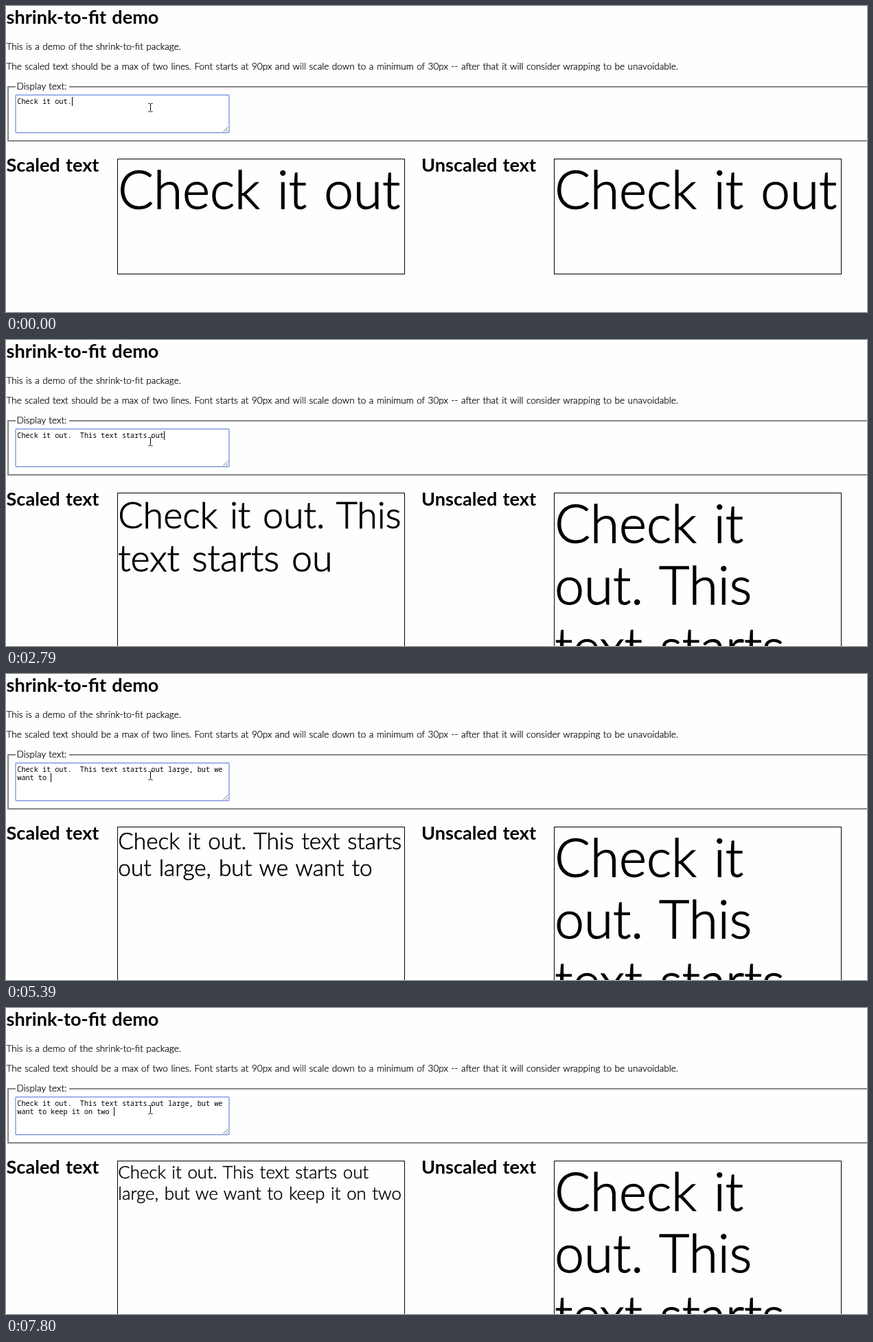
Animation of 1254 by 447 pixels, one loop 8 s. Source, as an HTML page:

```html
<!DOCTYPE html>
<html lang="en">
<head>
<meta charset="utf-8">
<title>shrink-to-fit demo</title>
<style>
  html, body { margin: 0; width: 100%; height: 100%; overflow: hidden; background: #fefefe; }
  svg { display: block; font-family: Lato, "Open Sans", sans-serif; }
  text { word-spacing: .06em; }
  .head { font-weight: 700; }
  .light { font-weight: 300; }
  .light text { stroke: #000; stroke-width: .018em; }
  .mono { font: 10.18px "Noto Sans Mono", "DejaVu Sans Mono", monospace; word-spacing: 0; white-space: pre; }
  .line { fill: none; stroke: #000; }
</style>
</head>
<body>
<svg width="1254" height="447" viewBox="0 0 1254 447">
  <g class="head">
    <text x=".5" y="26">shrink-to-fit demo</text>
    <text x=".5" y="242">Scaled text</text>
    <text x="605" y="242">Unscaled text</text>
  </g>
  <g class="light" id="body">
    <text x=".5" y="64">This is a demo of the shrink-to-fit package.</text>
    <text x=".5" y="93" id="intro">The scaled text should be a max of two lines. Font starts at 90px and will scale down to a minimum of 30px -- after that it will consider wrapping to be unavoidable.</text>
    <text x="15.5" y="122">Display text:</text>
  </g>
  <path d="M14 118H3V197H1254M92 118H1254" fill="none" stroke="#868686" stroke-width="2"/>
  <rect x="14" y="130" width="311" height="55" rx="1" fill="#fff" stroke="#7f9be0" stroke-width="1.4"/>
  <path d="M316.5 183.5l7-7M320.5 183.5l3-3" class="line" style="stroke:#777"/>
  <text class="mono" x="16.3" y="143"></text>
  <text class="mono" x="16.3" y="155"></text>
  <rect id="caret" width="1" height="13"/>
  <path d="M207.5 142.5h2l1 1 1-1h2M210.5 143v10M207.5 154.5h2l1-1 1 1h2" class="line"/>
  <rect class="line box" x="162.5" y="223.5" width="418"/>
  <rect class="line box" x="798.5" y="223.5" width="418"/>
  <g class="light" id="scaled"></g>
  <g class="light" id="plain"></g>
</svg>
<script>
const $ = q => document.querySelector(q), $$ = q => [...document.querySelectorAll(q)];
const MESSAGE = "Check it out.  This text starts out large, but we want to keep it on two ";
const LOOP = 8000, LAG = 125, MAX = 90, MIN = 30, ROOM = 414;
const WRAP = 50, PITCH = 6.11;

// Typing runs: first step, last step, number of steps, characters before and after
const RUNS = [
  [130, 790, 6, 13, 20],
  [1220, 1600, 4, 20, 25],
  [1730, 2130, 4, 25, 30],
  [2270, 2790, 5, 30, 35],
  [2920, 3300, 3, 35, 38],
  [3450, 4120, 6, 38, 47],
  [4390, 4540, 2, 47, 49],
  [4680, 5390, 6, 49, 58],
  [5820, 6210, 4, 58, 60],
  [6350, 6490, 2, 60, 63],
  [6890, 7800, 8, 63, 73]
];

const pen = document.createElement("canvas").getContext("2d");
function emWidth(text, weight) {
  pen.font = `${weight} 100px Lato, "Open Sans", sans-serif`;
  return pen.measureText(text).width / 100 + .06 * (text.split(" ").length - 1);
}

// Scale of the display face relative to its nominal size
const scale = 411 / MAX / emWidth("Check it out", 300);
const width = text => emWidth(text, 300) * scale;
$(".head").style.fontSize = 222 / emWidth("shrink-to-fit demo", 700) + "px";
$("#body").style.fontSize = 981 / emWidth($("#intro").textContent, 300) + "px";

function typedAt(t) {
  let count = t < 0 ? 12 : 13;
  for (const [start, end, steps, from, to] of RUNS) {
    if (t < start) break;
    const step = Math.floor((t - start) / (end - start) * (steps - 1) + 1e-6) + 1;
    count = Math.round(from + (to - from) * Math.min(step, steps) / steps);
  }
  return count;
}

// Largest size at which the words fit on two lines, favouring a full first line
function shrink(words) {
  let best = { size: 0 };
  for (let cut = words.length; cut > 0; cut--) {
    const lines = [words.slice(0, cut).join(" "), words.slice(cut).join(" ")];
    const size = Math.min(MAX, ROOM / Math.max(...lines.map(width)));
    if (size > best.size * 1.02) best = { size, lines };
  }
  best.size = Math.max(MIN, best.size);
  return best;
}

function wrap(words) {
  const lines = [];
  for (const word of words) {
    const joined = lines.length ? lines[lines.length - 1] + " " + word : word;
    if (lines.length && width(joined) * MAX <= ROOM) lines[lines.length - 1] = joined;
    else lines.push(word);
  }
  return lines;
}

function show(group, x, size, lines) {
  group.style.fontSize = size * scale + "px";
  group.innerHTML = lines.map((line, i) =>
    `<text x="${x}" y="${225.5 + size * (.783 + i)}">${line}</text>`).join("");
}

const rows = $$("text.mono"), boxes = $$(".box"), caret = $("#caret");
let last = "";

function draw(now) {
  const t = now % LOOP, typed = typedAt(t), shown = typedAt(t - LAG);
  const key = typed + "/" + shown;
  if (key !== last) {
    last = key;
    const text = MESSAGE.slice(0, typed), second = typed > WRAP;
    rows[0].textContent = text.slice(0, WRAP);
    rows[1].textContent = text.slice(WRAP);
    caret.setAttribute("x", Math.floor(17 + PITCH * (second ? typed - WRAP : typed)));
    caret.setAttribute("y", second ? 145 : 133);

    const words = MESSAGE.slice(0, shown).trim().split(/\s+/);
    const fit = shrink(words), lines = wrap(words);
    show($("#scaled"), 163.3, fit.size, fit.lines);
    show($("#plain"), 799.3, MAX, lines.slice(0, 3));
    boxes.forEach(box => box.setAttribute("height", 78 + MAX * lines.length));
  }
  requestAnimationFrame(tick);
}

let begin;
function tick(now) {
  begin ??= now;
  draw(now - begin);
}
draw(0);
</script>
</body>
</html>
```
